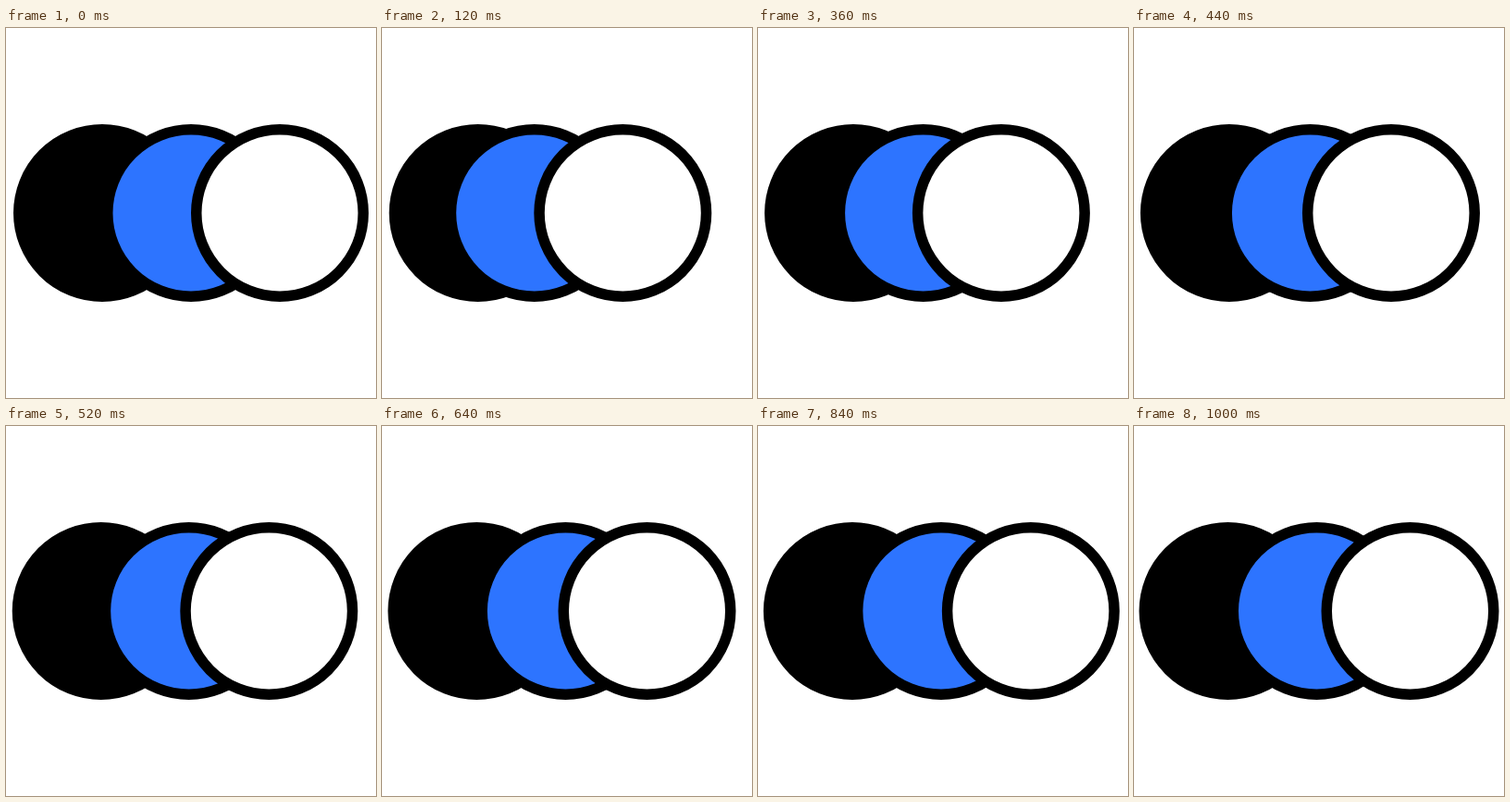
An HTML page for the animation above (1020 ms loop, 400 px wide and 400 px high).

```html
<!DOCTYPE html>
<html lang="en">
<head>
<meta charset="utf-8">
<title>Three circles</title>
<style>
  html, body { margin: 0; width: 100%; height: 100%; overflow: hidden; background: #fff; }
  svg { display: block; width: 100vw; height: 100vh; }
  circle { stroke: #000; stroke-width: 11.5; }
</style>
</head>
<body>
<svg viewBox="0 0 400 400">
  <circle id="back" cy="200" r="90.25" fill="#000"/>
  <circle id="middle" cy="200" r="90.25" fill="#2d74ff"/>
  <circle id="front" cy="200" r="90.25" fill="#fff"/>
</svg>
<script>
  const LOOP = 1020, STEP = 20;
  const DRIFT = 2.5 / 1000; // slow spread, px per ms

  // Keys are [time, offset]
  const middleKeys = [[0, 0], [160, -41], [560, 0]];
  const frontKeys = [[0, 0], [200, -55], [520, -13], [1000, 0]];

  const [back, middle, front] =
    ["back", "middle", "front"].map(id => document.getElementById(id));

  const ease = u => (1 - Math.cos(Math.PI * u)) / 2;

  function offsetAt(keys, t) {
    for (let i = 1; i < keys.length; i++) {
      const [t0, a] = keys[i - 1], [t1, b] = keys[i];
      if (t < t1) return a + (b - a) * ease((t - t0) / (t1 - t0));
    }
    return keys[keys.length - 1][1];
  }

  function render(t) {
    const drift = DRIFT * t;
    back.setAttribute("cx", 104 - drift);
    middle.setAttribute("cx", 200 - drift + offsetAt(middleKeys, t));
    front.setAttribute("cx", 296 + drift + offsetAt(frontKeys, t));
  }

  let start;
  function tick(now) {
    start ??= now;
    render(Math.floor((now - start) % LOOP / STEP) * STEP);
    requestAnimationFrame(tick);
  }

  render(0);
  requestAnimationFrame(tick);
</script>
</body>
</html>
```
